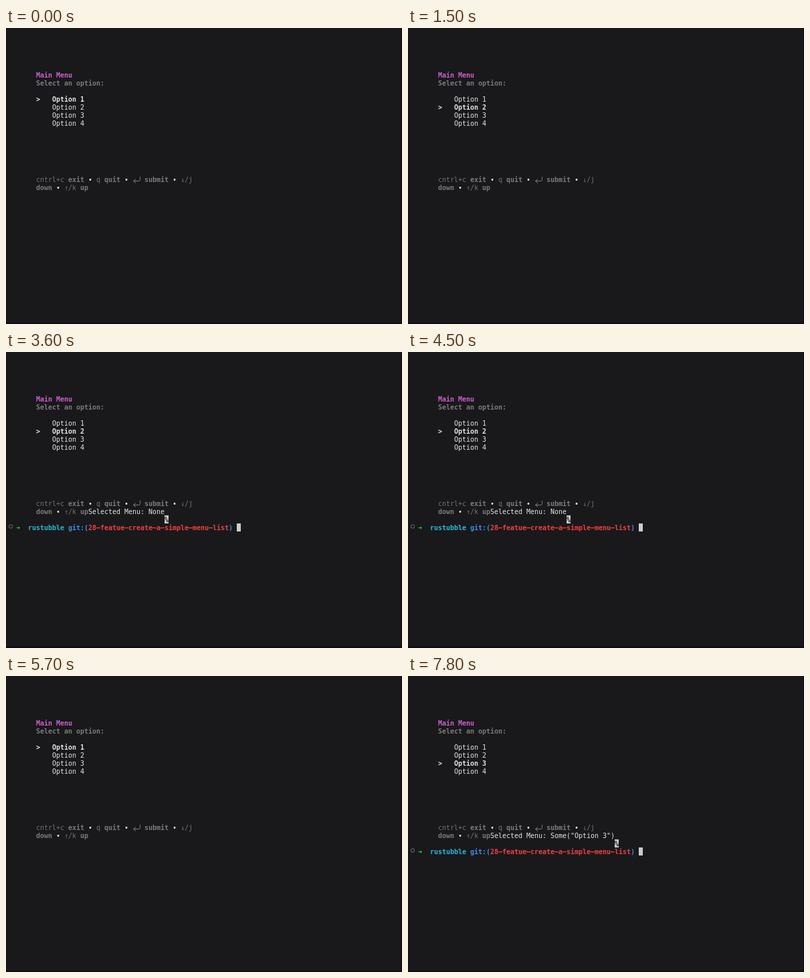
An HTML page with a canvas that plays this animation: 592x442 px, repeating every 8 s.

```html
<!DOCTYPE html>
<html lang="en">
<head>
<meta charset="utf-8">
<title>Terminal menu</title>
<style>
html, body { margin: 0; height: 100%; overflow: hidden; background: #19191b; }
canvas { display: block; }
</style>
</head>
<body>
<canvas id="stage" width="592" height="442"></canvas>
<script>
const ctx = document.getElementById('stage').getContext('2d');
const LOOP = 8000, CELL = 6, ROW = 12, LEFT = 15, MENU = 45;
const C = {
  bg: '#19191b', edge: '#0d0d0f', text: '#e5e5e5', dim: '#727272', grey: '#7b7b7b',
  pink: '#cf5fd0', green: '#23d160', cyan: '#29b8db', blue: '#3b8eea', red: '#f04040',
  cursor: '#cccccc'
};

// [start time, selected option]
const selections = [
  [0, 1], [400, 2], [600, 3], [800, 4], [1000, 3], [1200, 2], [1300, 1], [1500, 2],
  [1800, 3], [2000, 4], [2200, 3], [2400, 2], [5700, 1], [6500, 2], [6700, 3]
];
const QUIT = 3600, RECALL = 4800, ENTER = 5400, RESTART = 5700, SUBMIT = 7300;

const selectedAt = t => selections.filter(([start]) => start <= t).pop()[1];

// Draws text on the character grid and returns the x where it ends.
function write(text, x, top, color, bold) {
  ctx.font = `${bold ? 'bold ' : ''}10px "DejaVu Sans Mono", monospace`;
  ctx.fillStyle = color;
  for (const ch of text) {
    ctx.fillText(ch === '-' ? '–' : ch, x, top + 10); // hyphens fill the cell
    x += CELL;
  }
  return x;
}

function block(x, top) {
  ctx.fillStyle = C.cursor;
  ctx.fillRect(x, top, CELL, ROW);
}

function returnKey(x, top) {
  ctx.strokeStyle = C.grey;
  ctx.lineWidth = 1;
  ctx.stroke(new Path2D(
    `M${x + 11.5} ${top + 2}v4.5q0 2-2 2h-8m3.5-3l-3.5 3l3.5 3`));
}

function help(key, action, x, top) {
  if (key === '↵') {
    returnKey(x, top);
    x += 2 * CELL;
  } else {
    x = write(key, x, top, C.dim);
  }
  return write(action, x + CELL, top, C.grey, true);
}

const bullet = (x, top) => write(' • ', x, top, C.text);

function menu(selected) {
  write('Main Menu', MENU, 64, C.pink, true);
  write('Select an option:', MENU, 76, C.grey, true);
  for (let i = 1; i <= 4; i++) {
    const top = 88 + i * ROW, active = i === selected;
    if (active) write('>', MENU, top, C.text, true);
    write('Option ' + i, MENU + 4 * CELL, top, C.text, active);
  }
  let x = bullet(help('cntrl+c', 'exit', MENU, 220), 220);
  x = bullet(help('q', 'quit', x, 220), 220);
  x = bullet(help('↵', 'submit', x, 220), 220);
  write('↓/j', x, 220, C.dim);
  x = bullet(write('down', MENU, 232, C.grey, true), 232);
  return help('↑/k', 'up', x, 232);
}

function shell(x, result, command, entered) {
  x = write('Selected Menu: ' + result, x, 232, C.text);
  block(x, 244);
  write('%', x, 244, C.bg, true);

  ctx.strokeStyle = C.dim;
  ctx.lineWidth = 1;
  ctx.beginPath();
  ctx.arc(7, 260.5, 2.7, 0, 2 * Math.PI);
  ctx.stroke();

  x = write('➜  ', LEFT, 256, C.green, true);
  x = write('rustubble ', x, 256, C.cyan, true);
  x = write('git:(', x, 256, C.blue, true);
  x = write('28-featue-create-a-simple-menu-list', x, 256, C.red, true);
  x = write(') ', x, 256, C.blue, true);
  x = write(command, x, 256, C.text);
  if (entered) block(LEFT, 268);
  else block(x, 256);
}

function draw(t) {
  ctx.fillStyle = C.bg;
  ctx.fillRect(0, 0, 592, 442);
  ctx.fillStyle = C.edge;
  ctx.fillRect(591, 0, 1, 442);
  ctx.fillRect(0, 440, 592, 2);

  const end = menu(selectedAt(t));
  if (t >= SUBMIT) {
    shell(end, 'Some("Option 3")', '', false);
  } else if (t >= QUIT && t < RESTART) {
    const command = t >= RECALL ? 'cargo run --example menu_list_example' : '';
    shell(end, 'None', command, t >= ENTER);
  }
}

function tick() {
  draw(performance.now() % LOOP);
  requestAnimationFrame(tick);
}
tick();
</script>
</body>
</html>
```
